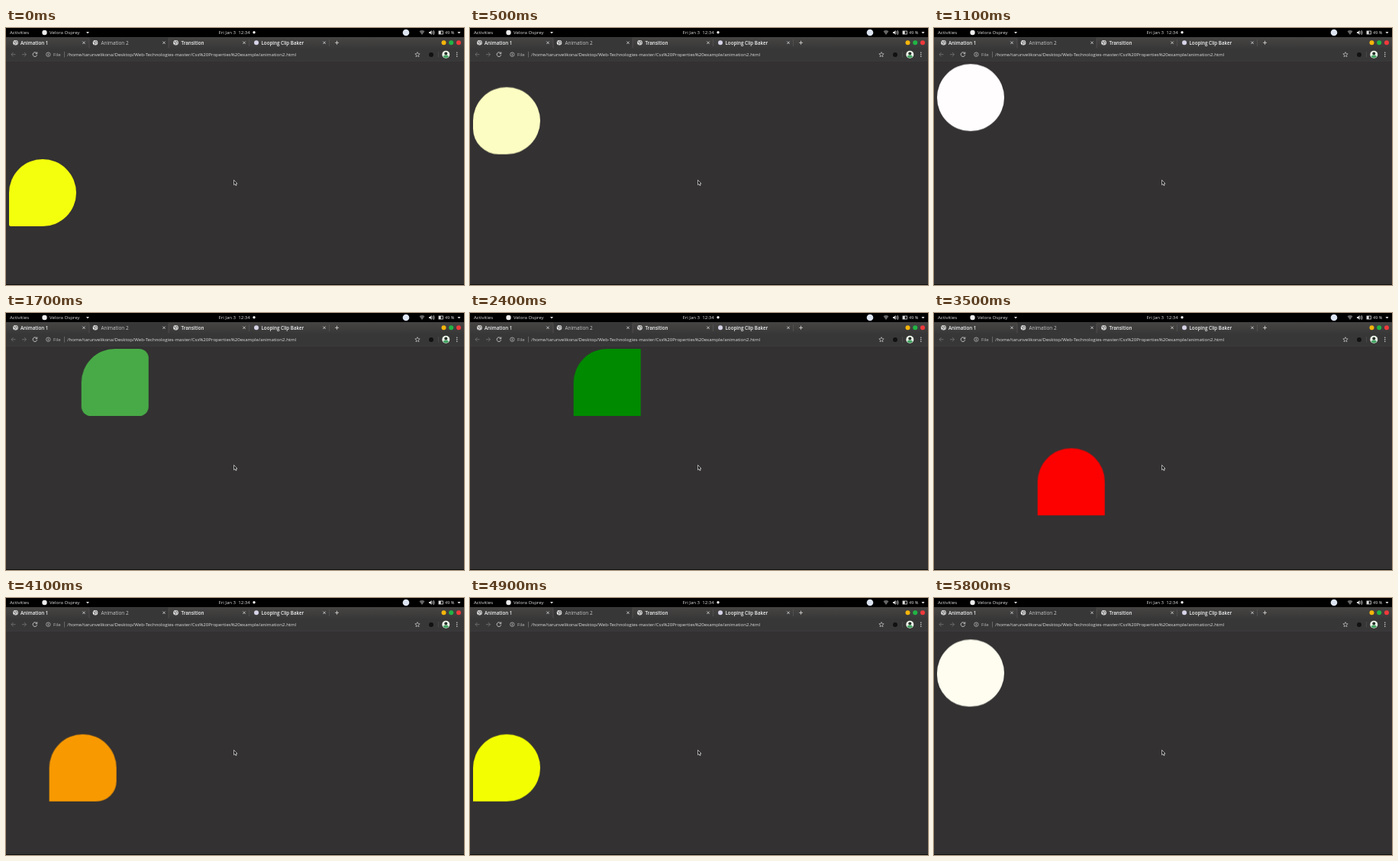
An HTML page that plays this animation: 600x337 px, repeating every 5900 ms.

```html
<!DOCTYPE html>
<html lang="en">
<head>
<meta charset="utf-8">
<title>Animation 2</title>
<style>
  html, body { margin: 0; width: 100%; height: 100%; overflow: hidden; background: #333132; }
  svg { position: absolute; left: 0; top: 0; }
  text { font: 6.1px "Open Sans", "Noto Sans", sans-serif; fill: #dedede; }
  .tab { font-size: 6.2px; font-weight: 600; fill: #f0f0f0; }
  .line { fill: none; stroke: #dcdcdc; stroke-width: .8; }
  #box { position: absolute; left: 3.5px; top: 47px; width: 88px; height: 88px; }
</style>
</head>
<body>
<div id="box"></div>
<svg width="600" height="337" viewBox="0 0 600 337">
  <defs>
    <linearGradient id="strip" x2="0" y2="1">
      <stop stop-color="#464544"/><stop offset="1" stop-color="#393838"/>
    </linearGradient>
    <g id="globe">
      <circle r="3.3" fill="#e4e4e4"/>
      <path d="M-2.4-1.2L-.6-.6L-.2.7L-1 2.3M.3-2.6L.9-1.1L2.5-.5M1 1.7L2.2.8" fill="none" stroke="#444" stroke-width=".9"/>
    </g>
    <path id="close" class="line" d="M-1.7-1.7L1.7 1.7M1.7-1.7L-1.7 1.7"/>
  </defs>

  <!-- system bar -->
  <rect width="600" height="12"/>
  <text x="5" y="8.2">Activities</text>
  <circle cx="50.5" cy="6" r="3.2" fill="#eee"/>
  <text x="57" y="8.2">Velora Osprey</text>
  <path d="M105 5h4l-2 2.6z" fill="#ddd"/>
  <text x="278.5" y="8.2" xml:space="preserve">Fri Jan 3  12:34</text>
  <circle cx="325" cy="5.8" r="1.7" fill="#eee"/>
  <circle cx="524" cy="6" r="4.3" fill="#dde4f2"/>
  <path d="M541.5 4.3Q545 1.7 548.5 4.3L545 9z" fill="#666"/>
  <path d="M554 5h1.5l2-2v6l-2-2H554z" fill="#ddd"/>
  <path class="line" d="M558.7 4.2q1.5 1.8 0 3.6M560 3q2.5 3 0 6"/>
  <rect class="line" x="567" y="4" width="5.5" height="4"/>
  <rect x="567" y="4" width="2.7" height="4" fill="#ddd"/>
  <text x="575" y="8.2" style="font-size:5.6px">49 %</text>
  <path d="M591.5 5h4l-2 2.6z" fill="#ddd"/>

  <!-- tab strip -->
  <rect y="12" width="600" height="15" fill="url(#strip)"/>
  <path d="M109 27V14q0-1.5 1.5-1.5h101q1.5 0 1.5 1.5v13z" fill="#383737"/>
  <path d="M109 14v12.5M213 14v12.5M318.5 15v9M423.5 15v9" stroke="#595858" stroke-width=".7"/>
  <use href="#globe" x="12.5" y="19.3"/>
  <use href="#globe" x="117" y="19.3"/>
  <use href="#globe" x="222.5" y="19.3"/>
  <circle cx="328" cy="19.3" r="3" fill="#d5d3e6"/>
  <text class="tab" x="19" y="21.6">Animation 1</text>
  <text x="124.5" y="21.6" style="font-size:6.4px;fill:#c6c6c6">Animation 2</text>
  <text class="tab" x="229.5" y="21.6">Transition</text>
  <text class="tab" x="334.5" y="21.6">Looping Clip Baker</text>
  <use href="#close" x="102" y="19.3"/>
  <use href="#close" x="207" y="19.3"/>
  <use href="#close" x="312" y="19.3"/>
  <use href="#close" x="417" y="19.3"/>
  <path class="line" d="M431 19.3h5M433.5 16.8v5"/>
  <circle cx="573.5" cy="19.3" r="3" fill="#f5b50a"/>
  <circle cx="583.2" cy="19.3" r="3" fill="#20b545"/>
  <circle cx="593" cy="19.3" r="3" fill="#f0393b"/>

  <!-- toolbar -->
  <rect y="27" width="600" height="16" fill="#383737"/>
  <path d="M0 43.3h600" stroke="#444243" stroke-width=".6"/>
  <path class="line" style="stroke:#777" d="M12.5 34.7H7M9.6 32L7 34.7l2.6 2.7M21 34.7h5.5M23.9 32l2.6 2.7-2.6 2.7"/>
  <path class="line" d="M40.2 33a2.8 2.8 0 1 0 .5 2.2M40.8 31.5v2.2h-2.2"/>
  <circle class="line" cx="55.3" cy="34.7" r="2.7" style="stroke-width:.6"/>
  <path class="line" d="M55.3 34.2v2M55.3 32.9v.7"/>
  <text x="62" y="36.9" style="fill:#b8b8b8">File</text>
  <path d="M76.5 31v7.5" stroke="#888" stroke-width=".6"/>
  <text x="80.3" y="36.9">/home/tarunvelikona/Desktop/Web-Technologies-master/Css%20Properties%20example/animation2.html</text>
  <path class="line" style="stroke-width:.6" d="M539 31.6l.9 2.1 2.3.2-1.8 1.5.6 2.3-2-1.2-2 1.2.6-2.3-1.8-1.5 2.3-.2z"/>
  <circle cx="557" cy="35" r="3" fill="#111"/>
  <path d="M566.5 31v7.5" stroke="#555" stroke-width=".6"/>
  <circle cx="576.3" cy="34.8" r="5" fill="#edf4e9"/>
  <path d="M572.8 37.8q0-2.4 3.5-2.4t3.5 2.4q-3.5 3-7 0z" fill="#47a565"/>
  <circle cx="576.3" cy="33.6" r="2" fill="#27332b"/>
  <path d="M590.8 32.3v.01M590.8 34.8v.01M590.8 37.3v.01" stroke="#e4e4e4" stroke-width="1.4" stroke-linecap="round"/>

  <path d="M0 336.5h600" stroke="#111"/>
  <path d="M298.5 199.3v6.5l1.5-1.3 1 2.2 1.1-.5-1-2.1h1.9z" fill="#111" stroke="#e8e8e8" stroke-width=".7"/>
</svg>
<script>
  const LOOP = 5900, STEP = 100, LEAD = 84, SIDE = 131.7;
  const pose = (x, y, backgroundColor, borderRadius) => ({
    transform: `translate(${x * SIDE}px, ${y * SIDE}px)`,
    backgroundColor, borderRadius, easing: 'ease'
  });
  const start = pose(0, 1, '#f3ff00', '50% 50% 50% 0%');
  const motion = document.getElementById('box').animate([
    start,
    pose(0, 0, '#fffdfd', '50% 50% 50% 50%'),
    pose(1, 0, '#008a00', '50% 0% 0% 0%'),
    pose(1, 1, '#ff0000', '50% 50% 0% 0%'),
    start
  ], { duration: 5000, iterations: Infinity });
  motion.pause();

  // The picture advances in steps of a tenth of a second.
  function draw() {
    const t = performance.now() % LOOP;
    motion.currentTime = Math.floor(t / STEP) * STEP + LEAD;
    requestAnimationFrame(draw);
  }
  draw();
</script>
</body>
</html>
```
